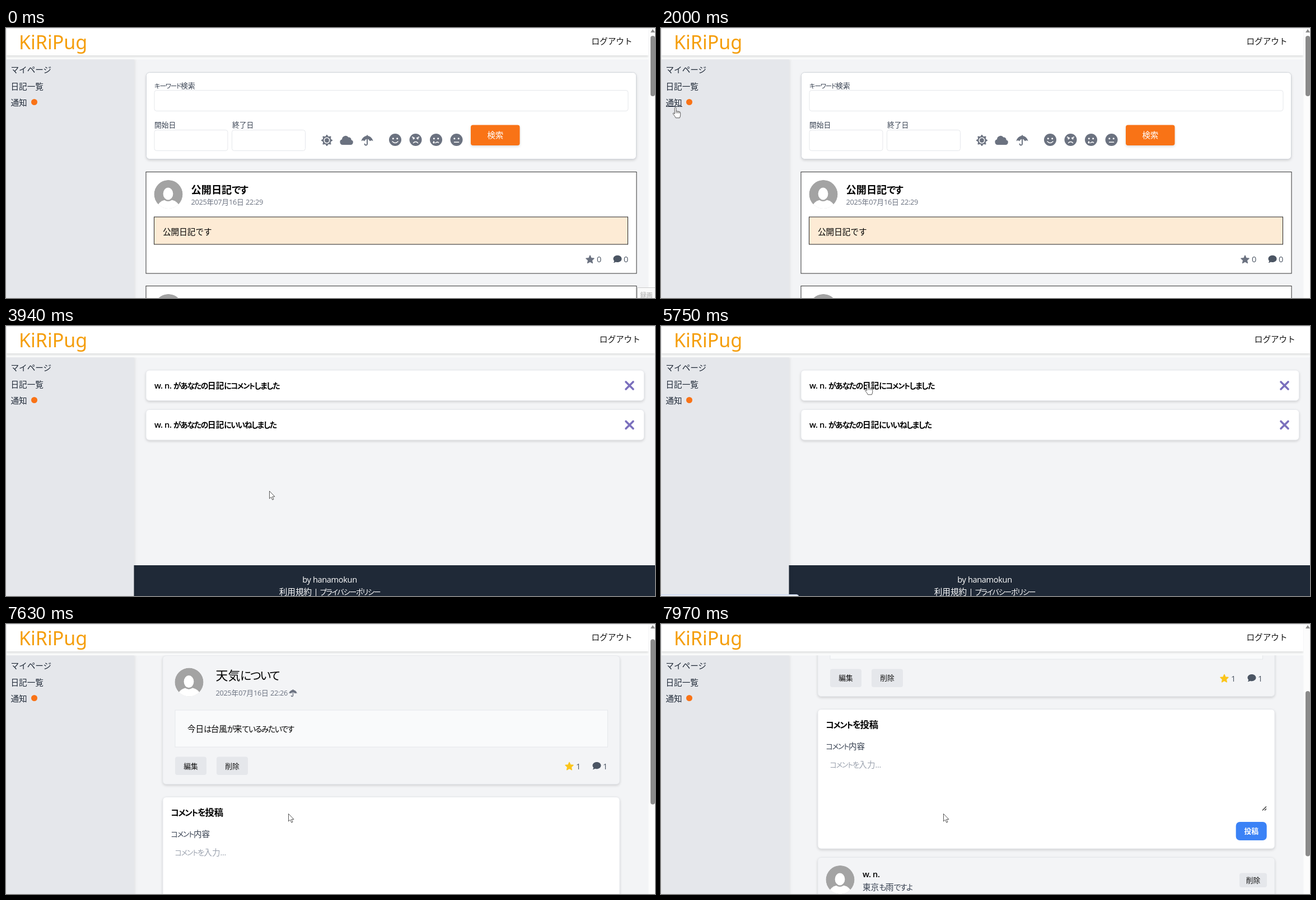
Write an HTML page that moves like this. It is 1159 px wide and 483 px high and loops after 8000 ms.

```html
<!DOCTYPE html>
<html lang="ja">
<head>
<meta charset="utf-8">
<title>Diary</title>
<style>
html, body { margin: 0; width: 100%; height: 100%; overflow: hidden; background: #f3f4f6; }
svg { display: block; width: 100vw; height: 100vh; }
text { font-family: "Open Sans", "Noto Sans CJK JP", "Noto Sans CJK", sans-serif; white-space: pre; }
.hira, .kata { font-feature-settings: "palt"; letter-spacing: -.1em; }
.hira { font-size: .95em; }
.kata { font-size: .9em; }
.latin { letter-spacing: -.025em; }
.card { filter: drop-shadow(0 2px 2px rgba(0, 0, 0, .14)); }
</style>
</head>
<body>
<svg id="stage" viewBox="0 0 1159 483" xmlns="http://www.w3.org/2000/svg"></svg>
<script>
const LOOP = 8000;
const INK = '#1f2937', GRAY = '#6b7280', DARK = '#4b5563', ORANGE = '#f97316';
const BRAND = 'KiRiPug', FRIEND = 'w. n.', AUTHOR = 'hanamokun';

// Drawing helpers
const rect = (x, y, w, h, fill, more = '') =>
  `<rect x="${x}" y="${y}" width="${w}" height="${h}" fill="${fill}" ${more}/>`;
const at = (x, y, body, more = '') => `<g transform="translate(${x} ${y})" ${more}>${body}</g>`;
const card = (x, y, w, h, fill = '#fff', line = '#e5e7eb') =>
  rect(x + .5, y + .5, w - 1, h - 1, fill, `rx="6" stroke="${line}" class="card"`);
const field = (x, y, w, h) => rect(x + .5, y + .5, w - 1, h - 1, '#fff', 'rx="4" stroke="#e5e7eb"');

// Small proportional kana, slightly tight Latin, full-width kanji
function runs(str, wide) {
  return str.replace(/([ぁ-ん]+)|([ァ-ヶー]+)|[ -~]+/g, (s, hira, kata) => {
    if (wide && (hira || kata)) return s;
    return `<tspan class="${hira ? 'hira' : kata ? 'kata' : 'latin'}">${s}</tspan>`;
  });
}
function text(x, y, str, { size = 14.6, fill = '#111', weight = 400, mid = false, wide = false } = {}) {
  return `<text x="${x}" y="${y}" font-size="${size}" fill="${fill}" font-weight="${weight}"` +
    `${mid ? ' text-anchor="middle"' : ''}>${runs(str, wide)}</text>`;
}
function button(x, y, w, h, label, { fill = '#e5e7eb', ink = '#111', size = 12.8, weight = 400, r = 4 } = {}) {
  return rect(x, y, w, h, fill, `rx="${r}"`) +
    text(x + w / 2, y + h / 2 + size * .37, label, { fill: ink, size, weight, mid: true });
}

// Icons
function starPath(n, outer, inner) {
  let d = '';
  for (let i = 0; i < n * 2; i++) {
    const r = i % 2 ? inner : outer, a = Math.PI * i / n - Math.PI / 2;
    d += `${i ? 'L' : 'M'}${(r * Math.cos(a)).toFixed(2)} ${(r * Math.sin(a)).toFixed(2)}`;
  }
  return d + 'Z';
}
const star = (x, y, fill) => at(x, y,
  `<path d="${starPath(5, 7.4, 3.5)}" fill="${fill}" stroke="${fill}" stroke-width="1.4" stroke-linejoin="round"/>`);
const bubble = (x, y) => at(x, y,
  `<path d="M0 -6.5C4.3 -6.5 7.5 -3.8 7.5 -.4S4.3 5.7 0 5.7Q-1.6 5.7 -3 5.2Q-4.8 6.7 -7.3 6.6Q-5.8 5 -5.8 3.4Q-7.5 1.7 -7.5 -.4C-7.5 -3.8 -4.3 -6.5 0 -6.5Z" fill="${DARK}"/>`);
const sun = (x, y) => at(x, y,
  `<path d="${starPath(8, 10, 6.8)}" fill="${GRAY}" stroke="${GRAY}" stroke-linejoin="round"/>` +
  `<circle r="4.7" fill="${GRAY}" stroke="#fff" stroke-width="1.6"/>`);
const cloud = (x, y) => at(x, y,
  `<path d="M-6.5 8A5 5 0 0 1 -8 -1.8A6.4 6.4 0 0 1 3.6 -5.4A4.2 4.2 0 0 1 8.6 -.8A4.5 4.5 0 0 1 7 8Z" fill="${GRAY}"/>`);
const umbrella = (x, y, k = 1) => `<g transform="translate(${x} ${y}) scale(${k})">` +
  `<path d="M-10.5 1.5C-9.5 -4 -5.5 -7.5 -1 -8V-9.5H1V-8C5.5 -7.5 9.5 -4 10.5 1.5Q7.5 -1.5 5 1.5Q2.5 -2.5 0 -2.5T-5 1.5Q-7.5 -1.5 -10.5 1.5Z" fill="${GRAY}"/>` +
  `<path d="M0 -3V6.3A2.2 2.2 0 0 1 -4.4 6.5" fill="none" stroke="${GRAY}" stroke-width="2" stroke-linecap="round"/></g>`;
const face = (x, marks) => at(x, 200,
  `<circle r="11" fill="${GRAY}"/><g fill="none" stroke="#fff" stroke-width="1.5" stroke-linecap="round">` +
  `<circle cx="-3.7" cy="-2.3" r=".8" fill="#fff"/><circle cx="3.7" cy="-2.3" r=".8" fill="#fff"/>${marks}</g>`);
const avatar = (x, y) => at(x, y, `<g clip-path="url(#disc)"><circle r="25.6" fill="#a3a3a3"/>` +
  `<ellipse cy="24" rx="20" ry="14.5" fill="#fff"/>` +
  `<ellipse cx="-.5" cy="-1" rx="10.2" ry="12.3" fill="#fff" stroke="#a3a3a3" stroke-width="2.6"/></g>`);
const cross = (y) => at(1113.5, y,
  '<path d="M-6.5 -6.5L6.5 6.5M6.5 -6.5L-6.5 6.5" stroke="#7a6fbd" stroke-width="3.6" stroke-linecap="round"/>');

// Pages
function listPage() {
  const label = { size: 12.8, weight: 500, fill: '#374151' };
  const post = (y) => rect(250, y + .5, 876, 181.5, '#fff', 'stroke="#333"') + avatar(290, y + 40.5);
  return card(250, 79, 876, 156, '#fff', '#d1d5db') +
    text(265, 107.5, 'キーワード検索', label) + field(264.5, 111, 847, 38) +
    text(265, 178, '開始日', label) + field(264.5, 182, 132, 38) +
    text(404, 178, '終了日', label) + field(403, 182, 132, 38) +
    sun(573, 201) + cloud(608, 201) + umbrella(645, 201) +
    face(695, '<path d="M-5 3Q0 8 5 3"/>') +
    face(731.5, '<path d="M-6 -5L-2 -3M6 -5L2 -3M-4 5.5Q0 1.5 4 5.5"/>') +
    face(768, '<path d="M-1 5.5Q2 3 4.5 5"/><path d="M-4 1.8Q-7.4 6 -4 6.6Q-.8 6 -4 1.8Z" fill="#fff" stroke="none"/>') +
    face(804.5, '<path d="M-4 4.2H4"/>') +
    `<g class="card">${button(830, 173.5, 87.5, 36.5, '検索', { fill: ORANGE, ink: '#fff', size: 14.6 })}</g>` +
    post(257) + text(330.5, 295.5, '公開日記です', { size: 18.2, weight: 700, fill: '#000' }) +
    text(330.5, 315.5, '2025年07月16日 22:29', { size: 12.8, fill: GRAY }) +
    rect(264.5, 338, 846, 49, '#fdebd5', 'stroke="#222"') +
    text(280, 369.7, '公開日記です', { wide: true, fill: '#000' }) +
    star(1043, 414.5, GRAY) + text(1055, 419, '0', { fill: DARK }) +
    bubble(1092, 413.3) + text(1103, 419, '0', { fill: DARK }) + post(461);
}

function noticePage() {
  const notice = (y, what) => card(249.5, y, 890.5, 55.5) +
    text(265, y + 33, `${FRIEND} があなたの日記に${what}しました`, { weight: 600, fill: '#000' }) + cross(y + 28);
  return notice(78.5, 'コメント') + notice(149, 'いいね') +
    rect(227.5, 428, 932, 55, INK) +
    text(578, 459.3, `by ${AUTHOR}`, { fill: '#fff', mid: true }) +
    text(578, 481, '利用規約 | プライバシーポリシー', { fill: '#fff', mid: true });
}

function detailPage() {
  return card(279.5, 78.5, 817, 231, '#f3f4f6') + avatar(327, 126.5) +
    text(374.5, 122.8, '天気について', { size: 21.9, weight: 500, fill: '#000' }) +
    text(374.5, 150.5, '2025年07月16日 22:26', { size: 12.8, fill: GRAY }) + umbrella(512.5, 146, .7) +
    rect(302, 176.5, 772.5, 66, '#f9fafb', 'stroke="#e5e7eb"') +
    text(324, 215.5, '今日は台風が来ているみたいです', { fill: '#000' }) +
    button(302, 260, 56, 32.5, '編集') + button(376, 260, 56, 32.5, '削除') +
    star(1006, 277.3, '#fbc51b') + text(1018, 282, '1', { fill: DARK }) +
    bubble(1055, 276) + text(1066, 282, '1', { fill: DARK }) +
    card(279.5, 331.5, 817, 250.5) +
    text(294.5, 365.5, 'コメントを投稿', { size: 16.4, weight: 600, fill: '#000' }) +
    text(294.5, 403.5, 'コメント内容', { weight: 500, fill: '#374151' }) +
    text(301.5, 436.5, 'コメントを入力...', { fill: '#9ca3af' }) +
    '<path d="M1074 513L1081 506M1078 513L1081 510" stroke="#333" stroke-width="1.3"/>' +
    button(1026.7, 533.5, 55, 33, '投稿', { fill: '#3b82f6', ink: '#fff', weight: 700, r: 7 }) +
    card(279.5, 596.5, 817, 100, '#f3f4f6') + avatar(320, 637) +
    text(360, 632.7, FRIEND, { weight: 600, fill: '#000' }) +
    text(360, 655.3, '東京も雨ですよ', { fill: '#374151' }) +
    button(1033, 625, 49, 25.5, '削除');
}

const stage = document.getElementById('stage');
stage.innerHTML =
  '<defs><clipPath id="disc"><circle r="25.6"/></clipPath></defs>' +
  rect(0, 0, 1159, 483, '#f3f4f6') +
  `<g id="list">${listPage()}</g><g id="notices">${noticePage()}</g><g id="detail">${detailPage()}</g>` +
  rect(0, 56, 228.5, 440, '#e5e7eb', 'style="filter:drop-shadow(2px 0 2px rgba(0,0,0,.07))"') +
  rect(0, 49, 1159, 7, '#fbfcfc') + rect(0, 0, 1159, 49, '#fff', 'class="card" id="bar"') +
  `<text x="23" y="38" font-size="34" fill="#f59e0b" style="font-family:'Noto Sans',sans-serif">${BRAND}</text>` +
  `<g id="logout">${text(1045.5, 29, 'ログアウト', { wide: true })}</g>` +
  text(8.5, 80, 'マイページ', { wide: true, fill: INK }) + text(8.5, 109.5, '日記一覧', { fill: INK }) +
  text(8.5, 138.5, '通知', { fill: INK }) + rect(9, 140, 29, 1, INK, 'id="underline"') +
  `<circle cx="50.5" cy="132.5" r="5.5" fill="${ORANGE}"/>` +
  `<g id="scrollbar">${rect(1147.5, 0, 12, 483, '#fcfcfc')}<path d="M1151 8L1155 2L1159 8Z" fill="#8a8a8a"/>` +
  `${rect(1151, 14, 8, 108, '#8a8a8a', 'rx="4" id="thumb"')}</g>` +
  '<path d="M0 .5H1159M.5 0V483" stroke="#e3e4e6"/>' +
  `<g id="record">${rect(1127.5, 464.5, 40, 30, '#fafafa', 'stroke="#ccc"')}${text(1132.5, 482, '録画', { size: 11, fill: '#aaa' })}</g>` +
  rect(-5, 480.5, 0, 20, '#e9effa', 'rx="4" stroke="#c5d3ee" id="status"') +
  '<g id="cursor" stroke="#444" stroke-width=".9" stroke-linejoin="round" fill="#fff">' +
  '<path id="arrow" d="M.5 .5V14L3.6 11.2L5.8 16.2L8 15.2L5.8 10.4H10Z"/>' +
  '<path id="hand" d="M-1.6 11.8V1.6Q-1.5 .2 -.2 .2T1.2 1.6V7Q2.6 5.9 3.7 7.3Q5.2 6.4 6.2 7.9Q8.8 7.4 8.8 10V13.5Q8.8 16 7.4 18.8H.4Q-1 15.5 -4 12.2Q-5 10.4 -3.6 9.9Q-2.6 9.8 -1.6 11.8ZM1.2 7V10.5M3.7 7.3V10.5M6.2 7.9V10.8"/></g>';

const el = {};
stage.querySelectorAll('[id]').forEach(node => el[node.id] = node);
const show = (node, on) => node.style.display = on ? '' : 'none';

// Pointer hot spot: time, x, y
const PATH = [
  [550, 955, 449], [900, 430, 230], [1300, 34, 124], [1370, 32, 123], [1600, 14, 147],
  [1800, 8, 138], [2000, 26, 142], [2140, 17, 136], [2270, 15, 134], [2690, 15, 134],
  [3000, 24, 130], [3310, 41, 127], [3450, 56, 132], [3730, 56, 132], [3940, 470, 295],
  [4200, 480, 250], [4550, 385, 165], [4900, 350, 115], [5420, 374, 103], [5610, 374, 103],
  [5680, 371, 93], [5750, 369, 104], [6330, 369, 104], [6700, 430, 230], [7160, 505, 337], [7230, 504, 339]
];
function pointer(t) {
  const i = PATH.findIndex(p => p[0] > t);
  if (i < 0) return PATH[PATH.length - 1].slice(1);
  if (i === 0) return [-50, -50];
  const [t0, x0, y0] = PATH[i - 1], [t1, x1, y1] = PATH[i], k = (t - t0) / (t1 - t0);
  return [x0 + (x1 - x0) * k, y0 + (y1 - y0) * k];
}

function draw(t) {
  const page = t < 2620 ? 'list' : t < 6010 ? 'notices' : 'detail';
  for (const name of ['list', 'notices', 'detail']) show(el[name], name === page);

  const long = page !== 'notices';
  show(el.scrollbar, long);
  el.bar.setAttribute('width', long ? 1147.5 : 1159);
  el.logout.setAttribute('transform', `translate(${long ? 0 : 14.3} 0)`);

  const scroll = t < 7630 ? 0 : 22 + 157.5 * Math.min(1, (t - 7630) / 340);
  el.detail.setAttribute('transform', `translate(0 ${-scroll})`);
  el.thumb.setAttribute('y', 14 + scroll * .59);
  el.thumb.setAttribute('height', page === 'list' ? 108 : 295.5);

  const status = t >= 2550 && t < 3660 ? 161 : t >= 4900 && t < 6470 ? 246 : 0;
  show(el.status, status);
  el.status.setAttribute('width', status + 5);
  show(el.record, t < 70);

  const [x, y] = pointer(t);
  const onNav = x > 8 && x < 38 && y > 120 && y < 146;
  const onNotice = t < 6140 && t > 2690 && x > 265 && x < 489 && y > 90 && y < 118;
  show(el.underline, onNav);
  show(el.hand, onNav || onNotice);
  show(el.arrow, !onNav && !onNotice);
  el.cursor.setAttribute('transform', `translate(${x.toFixed(1)} ${y.toFixed(1)})`);
}

const start = performance.now();
function tick(now) {
  draw(Math.max(0, now - start) % LOOP);
  requestAnimationFrame(tick);
}
draw(0);
requestAnimationFrame(tick);
</script>
</body>
</html>
```
